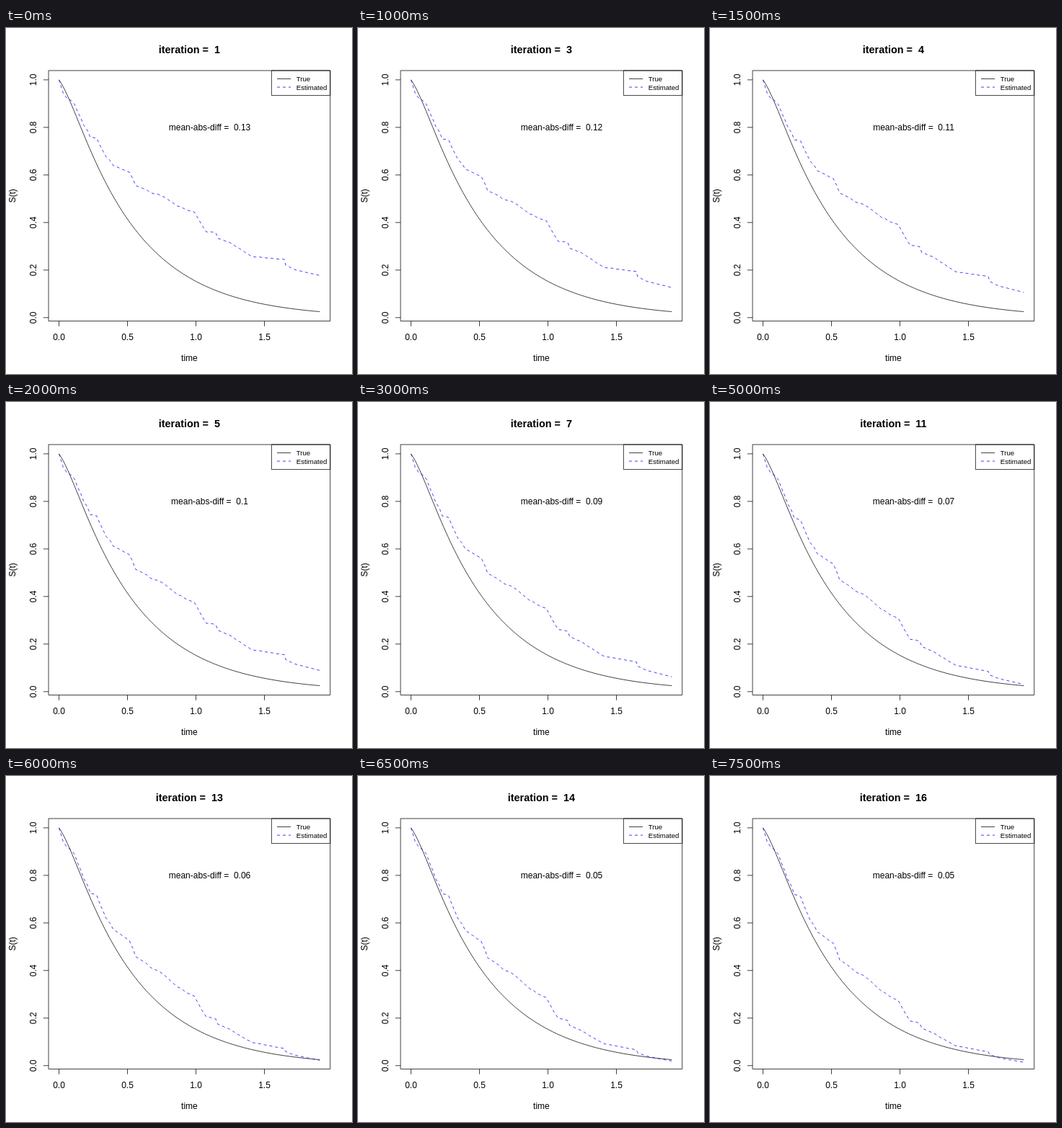
Recreate the animation shown at these times as an HTML page. Size 480 by 480 pixels, loop 8000 ms.

```html
<!DOCTYPE html>
<html lang="en">
<head>
<meta charset="utf-8">
<title>Survival estimate by iteration</title>
<style>
  html, body { margin: 0; width: 100%; height: 100%; overflow: hidden; background: #fff; }
  svg { display: block; width: 480px; height: 480px; }
  text { font: 12px "Liberation Sans", Arial, sans-serif; fill: #000; white-space: pre; }
  .mid { text-anchor: middle; }
  .title { font-size: 14.4px; font-weight: bold; }
  .key { font-size: 9.6px; }
  .line { fill: none; stroke: #000; stroke-width: .75; }
  .dash { stroke: #00f; stroke-dasharray: 4 4; }
</style>
</head>
<body>
<svg id="plot" viewBox="0 0 480 480">
  <text id="title" class="mid title" x="254.4" y="35"></text>
  <text class="mid" x="254.4" y="462">time</text>
  <text class="mid" transform="translate(13 232.8) rotate(-90)">S(t)</text>
  <path id="truth" class="line"/>
  <path id="estimate" class="line dash"/>
  <text id="diff" class="mid" x="282.5" y="142"></text>
  <path id="ticks" class="line"/>
  <path class="line" d="M59.04 59.04H449.76V406.56H59.04Z"/>
  <path class="line" d="M368.4 59.04H449.76V93.6H368.4Z"/>
  <path class="line" d="M376 70.56H395.2"/>
  <path class="line dash" d="M376 82.08H395.2"/>
  <text class="key" x="402.8" y="74">True</text>
  <text class="key" x="402.8" y="85.5">Estimated</text>
</svg>
<script>
const STEP = 500, COUNT = 16;
const X0 = 73.5, XU = 190, Y0 = 401.8, YU = 329.9, T_MAX = 1.904;
const $ = id => document.getElementById(id);
const toPixel = ([t, s]) => (X0 + XU * t).toFixed(2) + " " + (Y0 - YU * s).toFixed(2);
const path = pts => "M" + pts.map(toPixel).join("L");

function seeded(seed) {
  return () => (seed = seed * 16807 % 2147483647) / 2147483647;
}

// main bends of the first estimate: time, survival
const bends = [
  [0, 1], [.03, .945], [.113, .898], [.16, .838], [.23, .757], [.276, .754],
  [.324, .698], [.397, .639], [.513, .612], [.56, .555], [.692, .521], [.755, .511],
  [.866, .469], [.987, .445], [1.076, .36], [1.145, .357], [1.16, .333], [1.24, .318],
  [1.408, .257], [1.645, .245], [1.655, .221], [1.72, .202], [T_MAX, .177]
];

// The steps get rougher where many subjects are still at risk.
function roughen(points) {
  const random = seeded(11);
  const out = [points[0]];
  for (let k = 1; k < points.length; k++) {
    const [t0, s0] = points[k - 1], [t1, s1] = points[k];
    const n = Math.ceil((t1 - t0) / .03);
    for (let j = 1; j <= n; j++) {
      const s = s0 + (s1 - s0) * j / n;
      const wobble = j < n ? s * .012 : 0;
      out.push([
        t0 + (t1 - t0) * j / n + (random() - .5) * wobble,
        s + (random() - .5) * wobble
      ]);
    }
  }
  return out;
}
const firstFit = roughen(bends);

function progress(i) {
  const u = i / (COUNT - 1);
  return u * (1.4 - .4 * u);
}

// Each iteration raises survival to a power that grows with time.
function estimatePath(f) {
  return path(firstFit.map(([t, s]) =>
    [t, s ** (1 + .6 * f * t ** .8 + .0025 * f * f * t ** 8)]));
}

function truthPath() {
  const n = 120;
  return path(Array.from({ length: n + 1 }, (_, k) => {
    const t = T_MAX * k / n;
    return [t, Math.exp(-2 * t + .12 * (1 - Math.exp(-10 * t)))];
  }));
}

function label(value, transform) {
  const el = document.createElementNS("http://www.w3.org/2000/svg", "text");
  el.setAttribute("class", "mid");
  el.setAttribute("transform", transform);
  el.textContent = value.toFixed(1);
  $("plot").append(el);
}

function drawTicks() {
  let d = "";
  for (let k = 0; k < 4; k++) {
    const x = X0 + XU * k / 2;
    d += `M${x} 406.56v7.2`;
    label(k / 2, `translate(${x} 433)`);
  }
  for (let k = 0; k < 6; k++) {
    const y = Y0 - YU * k / 5;
    d += `M59.04 ${y}h-7.2`;
    label(k / 5, `translate(41.8 ${y}) rotate(-90)`);
  }
  $("ticks").setAttribute("d", d);
}

let shown = -1;
function frame() {
  const i = Math.floor(performance.now() / STEP) % COUNT;
  if (i !== shown) {
    shown = i;
    const f = progress(i);
    $("title").textContent = `iteration =  ${i + 1}`;
    $("diff").textContent = `mean-abs-diff =  ${+(.132 - .085 * f).toFixed(2)}`;
    $("estimate").setAttribute("d", estimatePath(f));
  }
  requestAnimationFrame(frame);
}

drawTicks();
$("truth").setAttribute("d", truthPath());
frame();
</script>
</body>
</html>
```
